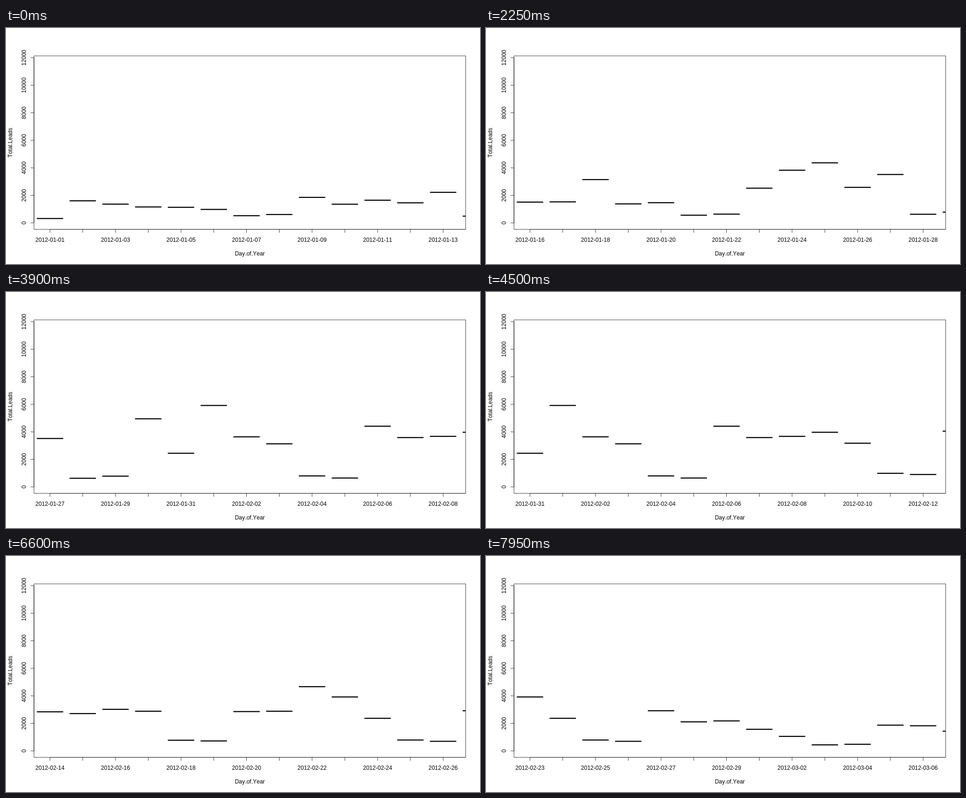
An HTML page for the animation above (8000 ms loop, 1000x500 px).

```html
<!DOCTYPE html>
<html lang="en">
<head>
<meta charset="utf-8">
<title>Total leads by day</title>
<style>
  html, body { margin: 0; width: 100%; height: 100%; overflow: hidden; background: #fff; }
  svg { display: block; width: 1000px; height: 500px; }
  text {
    font: 12px "Liberation Sans", Arial, sans-serif;
    font-kerning: none;
    text-anchor: middle;
  }
  .thin { fill: none; stroke: #000; stroke-width: .75; }
  .bar { fill: none; stroke: #000; stroke-width: 2.25; }
</style>
</head>
<body>
<svg viewBox="0 0 1000 500">
  <defs><clipPath id="plot"><rect x="59.04" y="59.04" width="910.72" height="367.52"/></clipPath></defs>
  <g id="axes"></g>
  <g id="dates"></g>
  <g clip-path="url(#plot)"><path id="bars" class="bar"/><path id="edges" class="thin" stroke-linecap="round"/></g>
</svg>
<script>
const LEFT = 59.04, TOP = 59.04, RIGHT = 969.76, BOTTOM = 426.56;
const FIRST = 92.77, STEP = 69.12, HALF = STEP * 0.4, TICK = 7.2;
const LOOP = 8000, HOLD = 150, SHOWN = 14;

// Daily totals from 1 January 2012
const leads = [
  324, 1603, 1366, 1164, 1137, 982, 523, 615, 1853, 1356, 1651, 1462, 2220, 495,
  489, 1507, 1528, 3146, 1380, 1469, 564, 640, 2519, 3828, 4363, 2580, 3520, 629,
  780, 4950, 2443, 5913, 3633, 3129, 797, 643, 4411, 3582, 3667, 3969, 3174, 986,
  900, 4045, 2844, 2714, 3016, 2879, 777, 725, 2861, 2886, 4669, 3918, 2371, 787,
  701, 2913, 2114, 2176, 1569, 1061, 444, 485, 1867, 1826, 1438
];

const $ = id => document.getElementById(id);
const xOf = slot => FIRST + slot * STEP;
const yOf = value => 412.95 - value * 350 / 12000;
const dateOf = day => new Date(Date.UTC(2012, 0, 1 + day)).toISOString().slice(0, 10);

function add(parent, tag, attrs, label = "") {
  const el = document.createElementNS("http://www.w3.org/2000/svg", tag);
  for (const key in attrs) el.setAttribute(key, attrs[key]);
  el.textContent = label;
  return $(parent).appendChild(el);
}
const line = d => add("axes", "path", { class: "thin", d });
const upright = (x, y, label) =>
  add("axes", "text", { transform: `translate(${x} ${y}) rotate(-90)` }, label);

line(`M${LEFT} ${TOP}H${RIGHT}V${BOTTOM}H${LEFT}Z`);
line(`M${LEFT} ${yOf(0)}V${yOf(12000)}`);
line(`M${xOf(0)} ${BOTTOM}H${RIGHT}`);
for (let v = 0; v <= 12000; v += 2000) {
  line(`M${LEFT} ${yOf(v)}h${-TICK}`);
  upright(41.8, yOf(v), v);
}
for (let slot = 0; slot < 13; slot++) line(`M${xOf(slot)} ${BOTTOM}v${TICK}`);
upright(13, 242.8, "Total.Leads");
add("axes", "text", { x: 514.4, y: 482 }, "Day.of.Year");

const dates = [0, 2, 4, 6, 8, 10, 12].map(slot => ({
  slot, el: add("dates", "text", { x: xOf(slot), y: 453 })
}));

function draw(start) {
  const d = leads.slice(start, start + SHOWN)
    .map((v, slot) => `M${xOf(slot) - HALF} ${yOf(v)}h${2 * HALF}`).join("");
  $("bars").setAttribute("d", d);
  $("edges").setAttribute("d", d);
  for (const { slot, el } of dates) el.textContent = dateOf(start + slot);
}

let current = -1;
function tick() {
  const start = Math.floor(performance.now() % LOOP / HOLD);
  if (start !== current) draw(current = start);
  requestAnimationFrame(tick);
}
tick();
</script>
</body>
</html>
```
